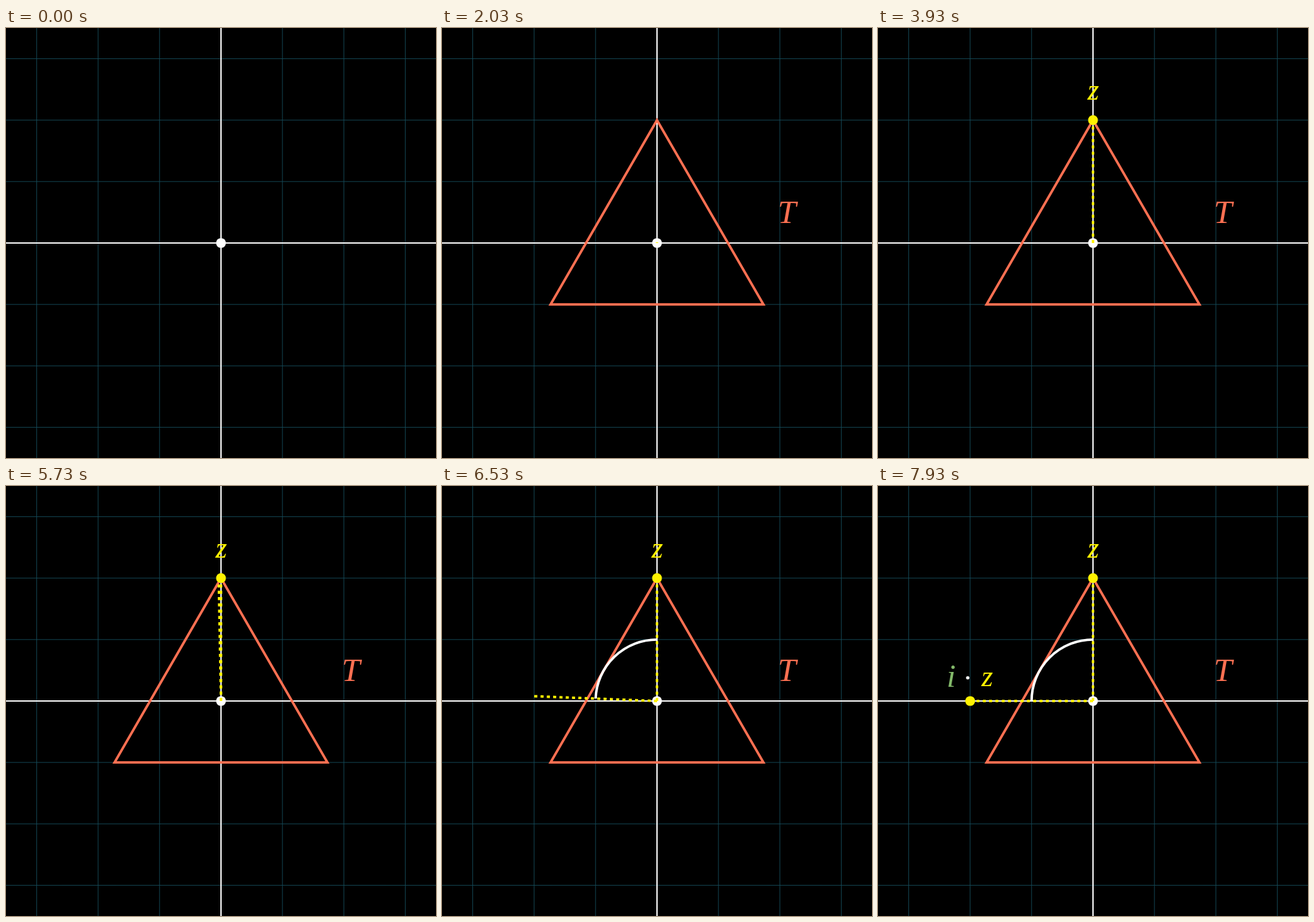
An HTML page with a canvas that plays this animation: 666 px wide and 666 px high, repeating every 8 s.

```html
<!DOCTYPE html>
<html lang="en">
<head>
<meta charset="utf-8">
<title>Turning a point by i</title>
<style>
html, body { margin: 0; width: 100%; height: 100%; overflow: hidden; background: #000; }
canvas { display: block; width: 100%; height: 100%; }
</style>
</head>
<body>
<canvas id="stage" width="666" height="666"></canvas>
<script>
const ctx = document.getElementById('stage').getContext('2d');
const SIZE = 666, MID = SIZE / 2, UNIT = SIZE / 7, LOOP = 8000;
const THIN = UNIT * 0.02, THICK = UNIT * 0.04, DOT = UNIT * 0.08;
const CORAL = '#ff7052', YELLOW = '#fff200', GREEN = '#83b96a', WHITE = '#fff', GRID = '#164a58';

const clamp = v => Math.min(1, Math.max(0, v));
const span = (t, from, to) => clamp((t - from) / (to - from));
const mix = (a, b, p) => a + (b - a) * p;
const sigmoid = x => 1 / (1 + Math.exp(-x));
const smooth = p => {
  const edge = sigmoid(-5);
  return clamp((sigmoid(10 * (p - 0.5)) - edge) / (1 - 2 * edge));
};
const doubleSmooth = p => p < 0.5 ? smooth(2 * p) / 2 : (1 + smooth(2 * p - 1)) / 2;

function line(x1, y1, x2, y2, color, width) {
  ctx.strokeStyle = color;
  ctx.lineWidth = width;
  ctx.beginPath();
  ctx.moveTo(x1, y1);
  ctx.lineTo(x2, y2);
  ctx.stroke();
}

// Traces the outline in the first half, then fades the fill in.
function write(p, { color, length, stroke, fill, endWidth = 0 }) {
  if (p <= 0) return;
  const drawn = clamp(2 * p), filled = clamp(2 * p - 1);
  ctx.save();
  ctx.strokeStyle = ctx.fillStyle = color;
  if (fill && filled > 0) {
    ctx.globalAlpha = filled;
    fill();
    ctx.globalAlpha = 1;
  }
  const width = mix(THIN, endWidth, filled);
  if (width > 0.01) {
    ctx.lineWidth = width;
    if (drawn < 1) ctx.setLineDash([length * drawn, length * 3]);
    stroke();
  }
  ctx.restore();
}

function glyph(p, char, cx, cy, size, color, length) {
  ctx.font = `italic ${size}px "Liberation Serif", serif`;
  const m = ctx.measureText(char);
  const x = cx - (m.actualBoundingBoxRight - m.actualBoundingBoxLeft) / 2;
  const y = cy + (m.actualBoundingBoxAscent - m.actualBoundingBoxDescent) / 2;
  write(p, {
    color, length,
    stroke: () => ctx.strokeText(char, x, y),
    fill: () => ctx.fillText(char, x, y)
  });
}

function disc(p, x, y, r, color) {
  const path = new Path2D();
  path.arc(x, y, r, 0, -2 * Math.PI, true);
  write(p, {
    color, length: 2 * Math.PI * r,
    stroke: () => ctx.stroke(path),
    fill: () => ctx.fill(path)
  });
}

function triangle(p) {
  const half = UNIT * Math.sqrt(3), path = new Path2D();
  path.moveTo(MID, MID - 2 * UNIT);
  path.lineTo(MID - half, MID + UNIT);
  path.lineTo(MID + half, MID + UNIT);
  path.closePath();
  write(p, { color: CORAL, length: 6 * half, endWidth: THICK, stroke: () => ctx.stroke(path) });
}

// Dashed radius of two units; dashes appear one after another.
function radius(angle, p) {
  const n = 20, len = 2 * UNIT, dash = len / n / 2, gap = len / (n - 1) / 2;
  const dx = -Math.sin(angle), dy = -Math.cos(angle);
  for (let i = 0; i < n; i++) {
    const part = clamp(p * n - i);
    if (part <= 0) break;
    const a = i * (dash + gap), b = a + dash * part;
    line(MID + dx * a, MID + dy * a, MID + dx * b, MID + dy * b, YELLOW, THICK);
  }
}

function plane() {
  ctx.fillStyle = '#000';
  ctx.fillRect(0, 0, SIZE, SIZE);
  for (let k = -3; k <= 3; k++) {
    if (!k) continue;
    const at = MID + k * UNIT;
    line(at, 0, at, SIZE, GRID, 0.95);
    line(0, at, SIZE, at, GRID, 0.95);
  }
  line(0, MID, SIZE, MID, WHITE, 2);
  line(MID, 0, MID, SIZE, WHITE, 2);
}

function draw(t) {
  plane();

  const shape = span(t, 15, 1170);
  triangle(shape);
  glyph(shape, 'T', 537.5, 285.5, 51, CORAL, 200);
  disc(1, MID, MID, DOT, WHITE);

  radius(0, smooth(span(t, 1930, 2900)));

  const angle = smooth(span(t, 5620, 6700)) * Math.PI / 2;
  if (angle > 0) {
    radius(angle, 1);
    ctx.strokeStyle = WHITE;
    ctx.lineWidth = THICK;
    ctx.beginPath();
    ctx.arc(MID, MID, UNIT, -Math.PI / 2, -Math.PI / 2 - angle, true);
    ctx.stroke();
  }

  const point = doubleSmooth(span(t, 2750, 3970));
  disc(point, MID, MID - 2 * UNIT, DOT, YELLOW);
  glyph(point, 'z', 333, 100.5, 46, YELLOW, 130);

  const image = span(t, 6700, 7925);
  const part = i => clamp(image * 1.4 - 0.2 * i);
  disc(image, MID - 2 * UNIT, MID, DOT, YELLOW);
  glyph(part(0), 'i', 113.7, 294, 51, GREEN, 80);
  disc(part(1), 139, 297, 2.6, WHITE);
  glyph(part(2), 'z', 168.7, 299, 46, YELLOW, 130);
}

const start = performance.now();
function tick() {
  draw((performance.now() - start) % LOOP);
  requestAnimationFrame(tick);
}
tick();
</script>
</body>
</html>
```
